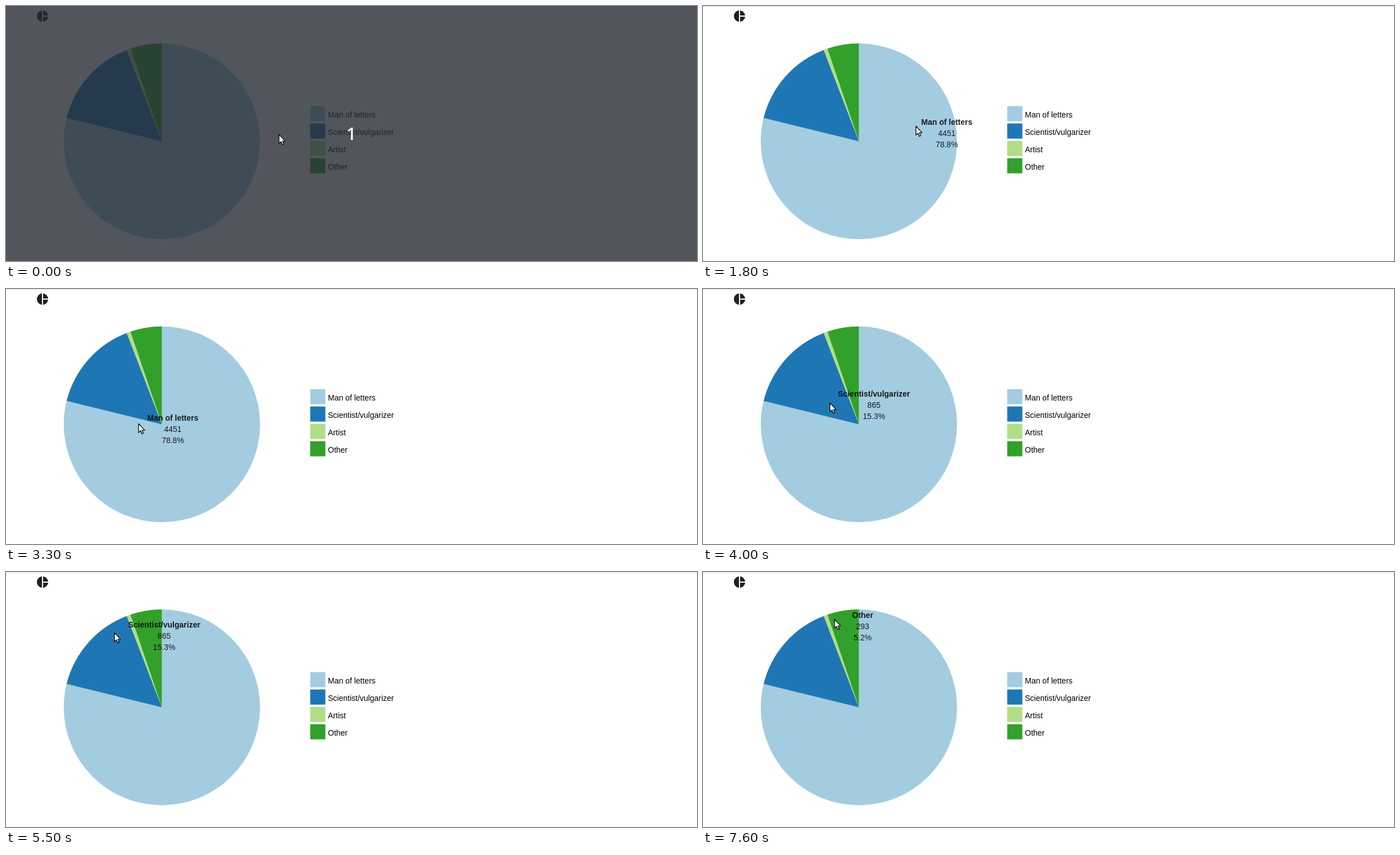
An HTML page with a canvas that plays this animation: 1230x455 px, repeating every 8 s.

```html
<!DOCTYPE html>
<html lang="en">
<head>
<meta charset="utf-8">
<title>Pie chart tooltip</title>
<style>
html, body { margin: 0; width: 100%; height: 100%; overflow: hidden; background: #fff; }
canvas { display: block; }
</style>
</head>
<body>
<canvas id="stage" width="1230" height="455"></canvas>
<script>
const ctx = document.getElementById('stage').getContext('2d');
const LOOP = 8000, STEP = 100, LAST_MOVE = 7600;
const PIE = { x: 277.5, y: 241.5, r: 174.7 };
const TURN = Math.PI * 2;
const PLAIN = '14px "Liberation Sans", Arial, sans-serif';
const BOLD = 'bold ' + PLAIN;

const slices = [
  { name: 'Man of letters', count: 4451, color: '#a3cce0' },
  { name: 'Scientist/vulgarizer', count: 865, color: '#1e77b4' },
  { name: 'Artist', count: 36, color: '#b0de87' },
  { name: 'Other', count: 293, color: '#33a02b' }
];
const total = slices.reduce((sum, s) => sum + s.count, 0);
let sum = 0;
for (const s of slices) {
  s.from = sum / total * TURN;
  sum += s.count;
  s.to = sum / total * TURN;
}

// Pointer path: arrival time, x, y and optional rest there
const path = [
  [1100, 486, 229], [1500, 452, 213], [1900, 368, 214, 200], [2600, 335, 261, 100],
  [2900, 303, 265], [3400, 231, 237, 200], [4000, 226, 203], [4500, 178, 168, 300],
  [5000, 177, 154], [5600, 197, 101], [6000, 220, 84, 1400], [7600, 234, 84], [7700, 245, 84]
].flatMap(([t, x, y, rest]) => rest ? [[t, x, y], [t + rest, x, y]] : [[t, x, y]]);

const icon = new Path2D('M11 2v20c-5.07-.5-9-4.79-9-10s3.93-9.5 9-10zm2.03 0v8.99H22' +
  'c-.47-4.74-4.24-8.52-8.97-8.99zm0 11.01V22c4.74-.47 8.5-4.25 8.97-8.99z');
const arrow = new Path2D('M0 .3V16.3L3.6 13 5.9 18.5 8.5 17.4 6.2 12.1H10.9Z');

// Slope at a path point: zero at rests and turns, otherwise a harmonic mean
function slope(i, axis) {
  if (i === 0 || i === path.length - 1) return 0;
  const rate = j => (path[j + 1][axis] - path[j][axis]) / (path[j + 1][0] - path[j][0]);
  const a = rate(i - 1), b = rate(i);
  return a * b > 0 ? 2 * a * b / (a + b) : 0;
}

function pointerAt(t) {
  const next = path.findIndex(p => p[0] > t);
  if (next === 0) return path[0].slice(1);
  if (next < 0) return path[path.length - 1].slice(1);
  const i = next - 1, span = path[next][0] - path[i][0];
  const s = (t - path[i][0]) / span, ease = s * s * (3 - 2 * s);
  return [1, 2].map(axis =>
    path[i][axis] + (path[next][axis] - path[i][axis]) * ease +
    span * s * (1 - s) * (slope(i, axis) * (1 - s) - slope(next, axis) * s));
}

function sliceAt(x, y) {
  const dx = x - PIE.x, dy = y - PIE.y;
  if (Math.hypot(dx, dy) > PIE.r) return null;
  const angle = (Math.atan2(dx, -dy) + TURN) % TURN;
  return slices.find(s => angle < s.to);
}

function text(str, x, y, font, color, align = 'left') {
  ctx.font = font;
  ctx.fillStyle = color;
  ctx.textAlign = align;
  ctx.fillText(str, x, y);
}

function drawChart() {
  ctx.fillStyle = '#fff';
  ctx.fillRect(0, 0, 1230, 455);
  ctx.fillStyle = '#e4e4e4';
  ctx.fillRect(0, 0, 1230, 1.5);

  ctx.save();
  ctx.translate(53, 6);
  ctx.fillStyle = '#212121';
  ctx.fill(icon);
  ctx.restore();

  slices.forEach((s, i) => {
    ctx.fillStyle = s.color;
    ctx.beginPath();
    ctx.moveTo(PIE.x, PIE.y);
    ctx.arc(PIE.x, PIE.y, PIE.r, s.from - TURN / 4, s.to - TURN / 4);
    ctx.fill();
    ctx.fillRect(541.5, 178.6 + i * 31, 27, 27);
    text(s.name, 573, 199 + i * 31, PLAIN, '#000');
  });
}

// The tooltip runs one step ahead of the drawn pointer
function drawTooltip(t) {
  const [px, py] = pointerAt(t + STEP);
  const s = sliceAt(px, py);
  if (!s) return;
  ctx.font = BOLD;
  const x = px + 20.5 + ctx.measureText(s.name).width / 2;
  const y = Math.round(py - 2);
  const share = (s.count / total * 100).toFixed(1) + '%';
  [s.name, s.count, share].forEach((line, i) =>
    text(line, x, y + i * 20, i ? PLAIN : BOLD, 'rgba(10,12,14,.92)', 'center'));
}

function drawPointer(t) {
  const [x, y] = pointerAt(t);
  ctx.save();
  ctx.translate(Math.round(x), Math.round(y));
  ctx.fillStyle = '#fff';
  ctx.strokeStyle = '#111';
  ctx.lineWidth = 1.4;
  ctx.lineJoin = 'round';
  ctx.fill(arrow);
  ctx.stroke(arrow);
  ctx.restore();
}

function drawCountdown() {
  ctx.fillStyle = 'rgba(39,44,52,.8)';
  ctx.fillRect(0, 0, 1230, 455);
  text('1', 614.5, 239, '600 30px "Open Sans", sans-serif', '#effcff', 'center');
}

function render(now) {
  const t = Math.min(Math.floor(now % LOOP / STEP) * STEP, LAST_MOVE);
  drawChart();
  drawTooltip(t);
  if (t < 500) drawCountdown();
  drawPointer(t);
}

const begin = performance.now();
function tick() {
  render(performance.now() - begin);
  requestAnimationFrame(tick);
}
tick();
</script>
</body>
</html>
```
